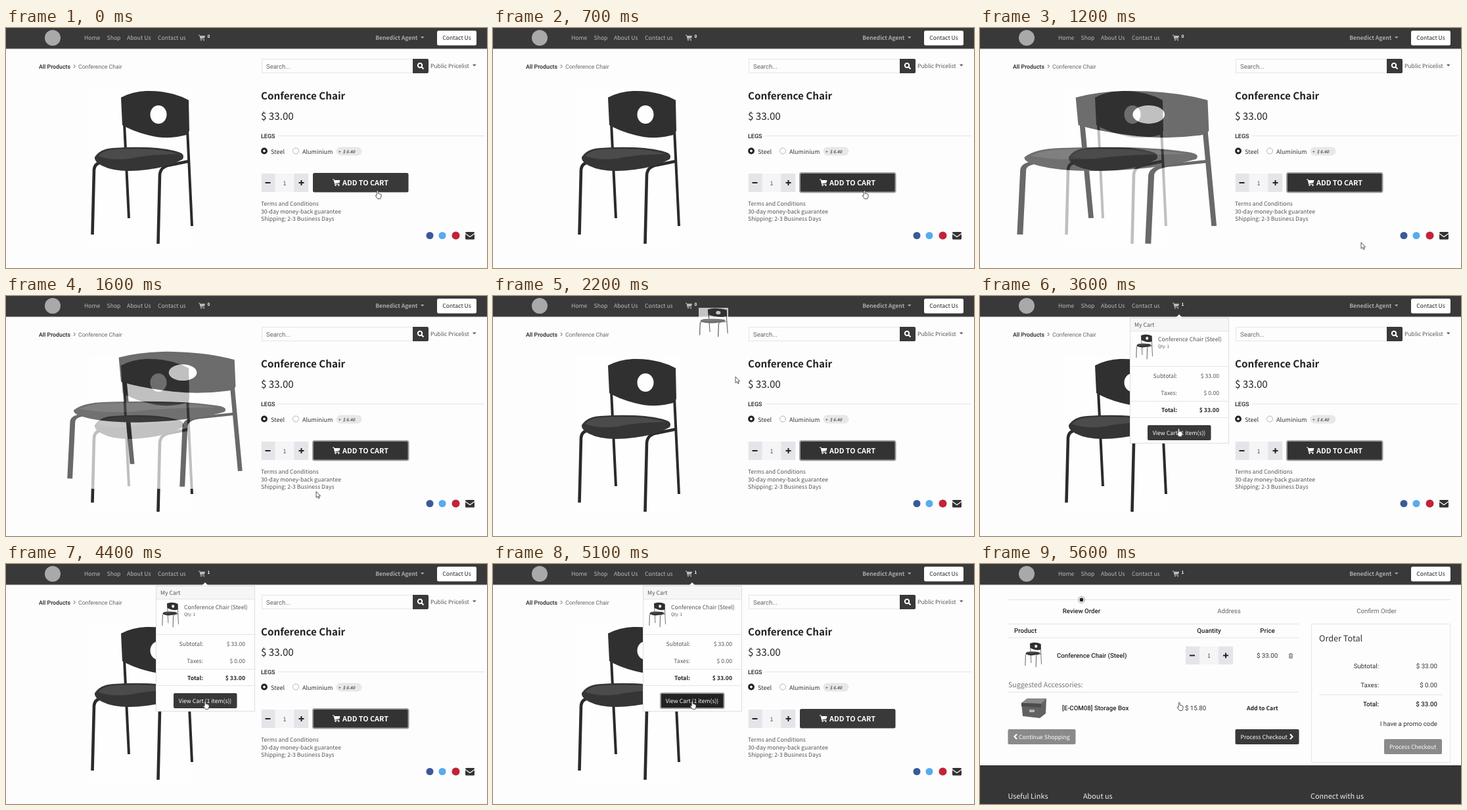
These frames come from a looping animation (732 px wide and 366 px high, 6400 ms). An HTML page:

```html
<!DOCTYPE html>
<html lang="en">
<head>
<meta charset="utf-8">
<title>Shop demo</title>
<style>
html, body { margin: 0; width: 100%; height: 100%; overflow: hidden; background: #fdfdfd; }
svg { display: block; width: 100vw; height: 100vh; }
text { font: 8.65px 'Noto Sans CJK JP', 'Noto Sans CJK SC', 'Noto Sans CJK', 'Noto Sans', sans-serif; fill: #555; text-rendering: geometricPrecision; white-space: pre; }
.r { font-family: Roboto, sans-serif; font-size: 9.7px; fill: #333; }
.b { font-weight: 700; fill: #222; }
.r.b { font-weight: 500; }
.e { text-anchor: end; }
.m { text-anchor: middle; }
.w { fill: #fff; }
.nav { fill: #b9b9b9; }
.foot { font-size: 10.85px; fill: #eee; }
.dark { fill: #39393a; }
.mid { fill: #8a8a8a; }
.line { stroke: #e4e4e4; fill: none; }
.ring { stroke: #9a9a9a; stroke-width: 2; fill: #333; }
.icon { fill: none; stroke-width: 2; }
</style>
</head>
<body>
<svg viewBox="0 0 732 366">
  <defs>
    <symbol id="chair" viewBox="126 92 160 241" preserveAspectRatio="none">
      <path d="M126 92h160v241H126z" fill="#fefefe"/>
      <g fill="none" stroke="#2b2b2c" stroke-width="4.6">
        <path d="M180 145L187 290M276 155L283 302" stroke-width="4"/>
        <path d="M131.500 315L134 216Q135 205 148 205M231.500 329L234 224Q235 211 250 209L279 203"/>
      </g>
      <path d="M175 106Q192 97 213 96Q250 95 278 110L279 156Q278 163 270 164Q243 171 215 163Q192 157 177 148Z" fill="#303031"/>
      <ellipse cx="232" cy="132" rx="12.500" ry="14" fill="#fefefe"/>
      <path d="M135 197Q143 184 163 183Q230 179 262 189Q273 192 269 200Q248 212 215 216Q170 222 146 210Q134 204 135 197Z" fill="#353536"/>
      <path d="M140 195Q150 185 168 185Q230 182 262 192Q215 193 190 199Q160 203 140 195Z" fill="#4b4b4c"/>
    </symbol>
    <symbol id="basket" viewBox="0 0 12 11">
      <path d="M0 .5H2.300L2.700 2H11.500L10.300 6.300L4.200 7L4.400 7.700H10.300V8.700H3.300L1.600 1.600H0Z"/>
      <circle cx="4.500" cy="9.900" r="1.100"/><circle cx="9.400" cy="9.900" r="1.100"/>
    </symbol>
    <symbol id="steps" viewBox="0 0 72 28">
      <path d="M0 0H72V28H0Z" fill="#f5f5f7"/>
      <path d="M0 0H21V28H0ZM50 0H72V28H50Z" fill="#e5e5e9"/>
      <path class="icon" stroke="#222" d="M6 14H14M57 14H65M61 10V18"/>
      <text class="m" x="35.500" y="17.500" style="font-size:9px">1</text>
    </symbol>
  </defs>

  <rect width="732" height="366" fill="#fdfdfd"/>

  <g id="product">
    <text class="r b" x="50" y="61.500" style="font-size:8.800px">All Products</text>
    <path class="icon" d="M103 56L105.500 58.500L103 61" stroke="#555" style="stroke-width:1"/>
    <text class="r" x="110" y="61.500" style="font-size:8.700px;fill:#666">Conference Chair</text>
    <rect class="line" x="389.500" y="47.500" width="230" height="21"/>
    <text class="r" x="396" y="61.500" style="font-size:9.500px;fill:#666">Search...</text>
    <path class="dark" d="M619 47H641Q643 47 643 49V67Q643 69 641 69H619Z"/>
    <g class="icon" stroke="#fff"><circle cx="630" cy="57" r="3.200"/><path d="M632.500 59.500L635.500 62.500"/></g>
    <text x="646" y="60.500" style="font-size:8.550px">Public Pricelist</text>
    <path d="M710 55.500H715.500L712.750 58.500Z" fill="#555"/>

    <use href="#chair" x="126" y="92" width="160" height="241"/>

    <text class="b" x="388" y="109" style="font-size:15.200px">Conference Chair</text>
    <text x="388" y="140" style="font-size:15.200px;fill:#222">$ 33.00</text>
    <text class="r b" x="388" y="167.500" style="font-size:9px">LEGS</text>
    <path class="line" d="M414 164.500H728"/>
    <circle cx="393" cy="187.500" r="3.400" fill="#fff" stroke="#222" stroke-width="3"/>
    <text x="403" y="191.500" style="font-size:9.050px;fill:#333">Steel</text>
    <circle cx="441" cy="187.500" r="4.500" fill="#fff" stroke="#b5b5b5"/>
    <text x="451" y="191.500" style="font-size:9.050px;fill:#333">Aluminium</text>
    <rect x="502.500" y="181.500" width="39" height="13" rx="6.500" fill="#e8e8e8"/>
    <text class="b" x="506" y="190.500" style="font-size:6.300px;fill:#555">+  <tspan font-style="italic">$ 6.40</tspan></text>

    <use href="#steps" x="388.500" y="222" width="72" height="28"/>
    <rect id="add" class="dark" x="467" y="221" width="145.500" height="29.500" rx="2.500"/>
    <use href="#basket" x="497" y="230" width="12" height="11" fill="#fff"/>
    <text class="b w" x="512" y="240" style="font-size:10.800px">ADD TO CART</text>

    <text x="388" y="271">Terms and Conditions</text>
    <text x="388" y="282.700">30-day money-back guarantee</text>
    <text x="388" y="294.400">Shipping: 2-3 Business Days</text>
    <circle cx="645" cy="316.500" r="5.500" fill="#3b5998"/>
    <circle cx="664" cy="316.500" r="5.500" fill="#55acee"/>
    <circle cx="684.500" cy="316.500" r="6" fill="#c02438"/>
    <rect x="699" y="311" width="14" height="11.500" rx="1.500" fill="#333"/>
    <path d="M699 313.500L706 318.500L713 313.500" fill="none" stroke="#fff" stroke-width="1.200"/>
  </g>

  <g id="order">
    <path class="line" d="M43 54.500H716M43 91.500H485M43 112.500H485M43 195.500H485M504.500 91.500H715.500V302.500H504.500ZM516 199.500H704"/>
    <circle cx="154.500" cy="54.500" r="5" fill="#fff" stroke="#999"/>
    <circle cx="154.500" cy="54.500" r="2.900" fill="#222"/>
    <text class="r b m" x="154.500" y="75">Review Order</text>
    <text class="r m" x="379" y="75" style="fill:#666">Address</text>
    <text class="r m" x="603.500" y="75" style="fill:#666">Confirm Order</text>
    <text class="r b" x="52" y="105">Product</text>
    <text class="r b m" x="348.500" y="105">Quantity</text>
    <text class="r b m" x="437.500" y="105">Price</text>
    <use href="#chair" x="68" y="119" width="26" height="39"/>
    <text class="r b" x="117" y="143">Conference Chair (Steel)</text>
    <use href="#steps" x="313" y="125.500" width="72" height="28"/>
    <text class="r" x="421" y="143">$ 33.00</text>
    <path d="M470 137.500H476M472 136.500H474M470.700 138V143.500H475.300V138M472.200 139V142.500M473.800 139V142.500" fill="none" stroke="#555" stroke-width=".8"/>
    <text x="43" y="187.500" style="font-size:10.600px;fill:#777">Suggested Accessories:</text>
    <path d="M63 212L72 205H101L100 228L91 235L65 232Z" fill="#626263"/>
    <path d="M63 212L72 205H101L93 213Z" fill="#8a8a8b"/>
    <path d="M63 212L93 213V219L63 217Z" fill="#4c4c4d"/>
    <path d="M75 222H83V226H75Z" fill="#b5b5b5"/>
    <text class="r b" x="125" y="222.500">[E-COM08] Storage Box</text>
    <text class="r" x="312" y="222.500">$ 15.80</text>
    <text class="b" x="406" y="222.500">Add to Cart</text>
    <rect class="mid" x="42.500" y="252" width="103" height="23" rx="2"/>
    <rect class="dark" x="388.500" y="252" width="97" height="23" rx="2"/>
    <rect class="mid" x="615" y="267" width="88" height="23" rx="2"/>
    <path class="icon" stroke="#fff" d="M56 259.500L52.500 263.300L56 267M472 259.500L475.500 263.300L472 267"/>
    <text class="w" x="59" y="266.500">Continue Shopping</text>
    <text class="w" x="396.500" y="266.500">Process Checkout</text>
    <text class="w" x="623" y="281.500">Process Checkout</text>
    <text x="516" y="118" style="font-size:12.700px;fill:#333">Order Total</text>
    <text class="r e" x="607" y="158.500">Subtotal:</text>
    <text class="r e" x="696" y="158.500">$ 33.00</text>
    <text class="r e" x="607" y="188">Taxes:</text>
    <text class="r e" x="696" y="188">$ 0.00</text>
    <text class="r b e" x="607" y="217">Total:</text>
    <text class="r b e" x="696" y="217">$ 33.00</text>
    <text class="r e" x="696" y="246.500">I have a promo code</text>
    <rect y="307" width="732" height="59" fill="#363637"/>
    <text class="foot" x="42.500" y="358">Useful Links</text>
    <text class="foot" x="157" y="358">About us</text>
    <text class="foot" x="503" y="358">Connect with us</text>
  </g>

  <g id="header">
    <rect y="31" width="732" height="1.500" fill="#dcdcdc"/>
    <rect class="dark" width="732" height="31.500"/>
    <circle cx="71" cy="15" r="12" fill="#a9a9a9"/>
    <text class="nav" x="119" y="18">Home</text>
    <text class="nav" x="153.500" y="18">Shop</text>
    <text class="nav" x="184" y="18">About Us</text>
    <text class="nav" x="231" y="18">Contact us</text>
    <use href="#basket" x="293" y="10" width="10.500" height="9.600" fill="#bdbdbd"/>
    <text id="count" class="b w" x="306.500" y="15.200" style="font-size:6.500px">0</text>
    <text class="b e" x="626.500" y="18" style="fill:#aaa">Benedict Agent</text>
    <path d="M631 13H636.500L633.750 16Z" fill="#aaa"/>
    <rect x="656" y="4" width="60" height="22.500" rx="2.500" fill="#fff"/>
    <text class="m" x="686" y="18.300" style="fill:#222">Contact Us</text>
  </g>

  <g id="popup">
    <rect x="228.500" y="33.500" width="150" height="191" fill="#fefefe" stroke="#dedede"/>
    <path d="M229 34H378V53H229ZM297.500 33.500L303 28L308.500 33.500Z" fill="#f6f6f6"/>
    <path class="line" d="M229 53.500H378M229 107.500H378M229 160.500H378M229 185.500H378"/>
    <text x="235" y="46.500">My Cart</text>
    <use href="#chair" x="237" y="58" width="26" height="39"/>
    <text x="271" y="68.500">Conference Chair (Steel)</text>
    <text x="271" y="79" style="font-size:6.300px">Qty: 1</text>
    <text class="e" x="300" y="124.500">Subtotal:</text>
    <text class="e" x="364" y="124.500">$ 33.00</text>
    <text class="e" x="300" y="150.500">Taxes:</text>
    <text class="e" x="364" y="150.500">$ 0.00</text>
    <text class="b e" x="300" y="177">Total:</text>
    <text class="b e" x="364" y="177">$ 33.00</text>
    <rect id="view" class="dark" x="255" y="197" width="96.500" height="23" rx="2"/>
    <text class="w m" x="303" y="211.800">View Cart (1 item(s))</text>
  </g>

  <use id="clone" href="#chair" opacity=".7"/>

  <g id="cursor" fill="#fff" stroke="#444" stroke-width=".9" stroke-linejoin="round">
    <path id="arrow" d="M0 0V9.500L2.200 7.500L3.700 10.800L5.200 10.100L3.800 7H6.600Z"/>
    <path id="hand" d="M-.8 .7Q.3 -.6 1.300 .7V4.500Q4 4.300 6 6V9L4.800 12.500H.5L-2.800 7.600Q-2.500 6.300 -.8 7.500Z"/>
  </g>
</svg>
<script>
const LOOP = 6400, STEP = 100;
const CLICK = 700, FLY = 1190, FLY_END = 2190, SHRINK = 400;
const OPEN = 2900, VIEW = 4600, CHECKOUT = 5200;
// Pointer stops: time, x, y
const path = [
  [0, 565, 248], [700, 565, 248], [1200, 580, 327], [1600, 472, 298], [2200, 369, 123],
  [2700, 298, 14], [3100, 298, 14], [3600, 302, 202], [4300, 303, 209], [5100, 303, 209],
  [5200, 303, 211], [LOOP, 303, 211]
];
// Product image box and its landing place by the cart: x, y, width, height
const from = [50, 92, 312, 241], to = [313, 18, 45, 45];

const $ = id => document.getElementById(id);
const show = (id, on) => { $(id).style.display = on ? '' : 'none'; };
const mix = (a, b, p) => a + (b - a) * p;
const clamp = p => Math.min(1, Math.max(0, p));
const inOutExpo = p => p <= 0 ? 0 : p >= 1 ? 1 :
  p < .5 ? 2 ** (20 * p - 10) / 2 : 1 - 2 ** (10 - 20 * p) / 2;

function pointer(t) {
  const i = path.findIndex(stop => stop[0] > t);
  const [t0, x0, y0] = path[i - 1], [t1, x1, y1] = path[i];
  const p = (t - t0) / (t1 - t0);
  return [mix(x0, x1, p), mix(y0, y1, p)];
}

function flyingBox(t) {
  const p = inOutExpo((t - FLY) / (FLY_END - FLY));
  const box = from.map((v, i) => mix(v, to[i], p));
  const q = clamp((t - FLY_END - 10) / SHRINK);
  const left = 1 - q * q * (3 - 2 * q);
  return [box[0], box[1], box[2] * left, box[3] * left];
}

function draw(t) {
  show('product', t < CHECKOUT);
  show('order', t >= CHECKOUT);
  show('popup', t >= OPEN && t < CHECKOUT);
  show('clone', t >= FLY && t < FLY_END + SHRINK);
  $('add').setAttribute('class', t >= CLICK && t < VIEW ? 'ring' : 'dark');
  $('view').setAttribute('class', t >= VIEW ? 'ring' : 'dark');
  $('view').style.fill = t >= VIEW ? '#222' : '';
  $('count').textContent = t < 2500 ? 0 : 1;

  const box = flyingBox(t);
  ['x', 'y', 'width', 'height'].forEach((name, i) => $('clone').setAttribute(name, box[i]));

  const hand = t < 800 || (t >= 2600 && t < 3200) || t >= 3500;
  show('hand', hand);
  show('arrow', !hand);
  $('cursor').setAttribute('transform', `translate(${pointer(t)})`);
}

const start = performance.now();
function tick() {
  const t = (performance.now() - start) % LOOP;
  draw(Math.floor(t / STEP) * STEP);
  requestAnimationFrame(tick);
}
tick();
</script>
</body>
</html>
```
